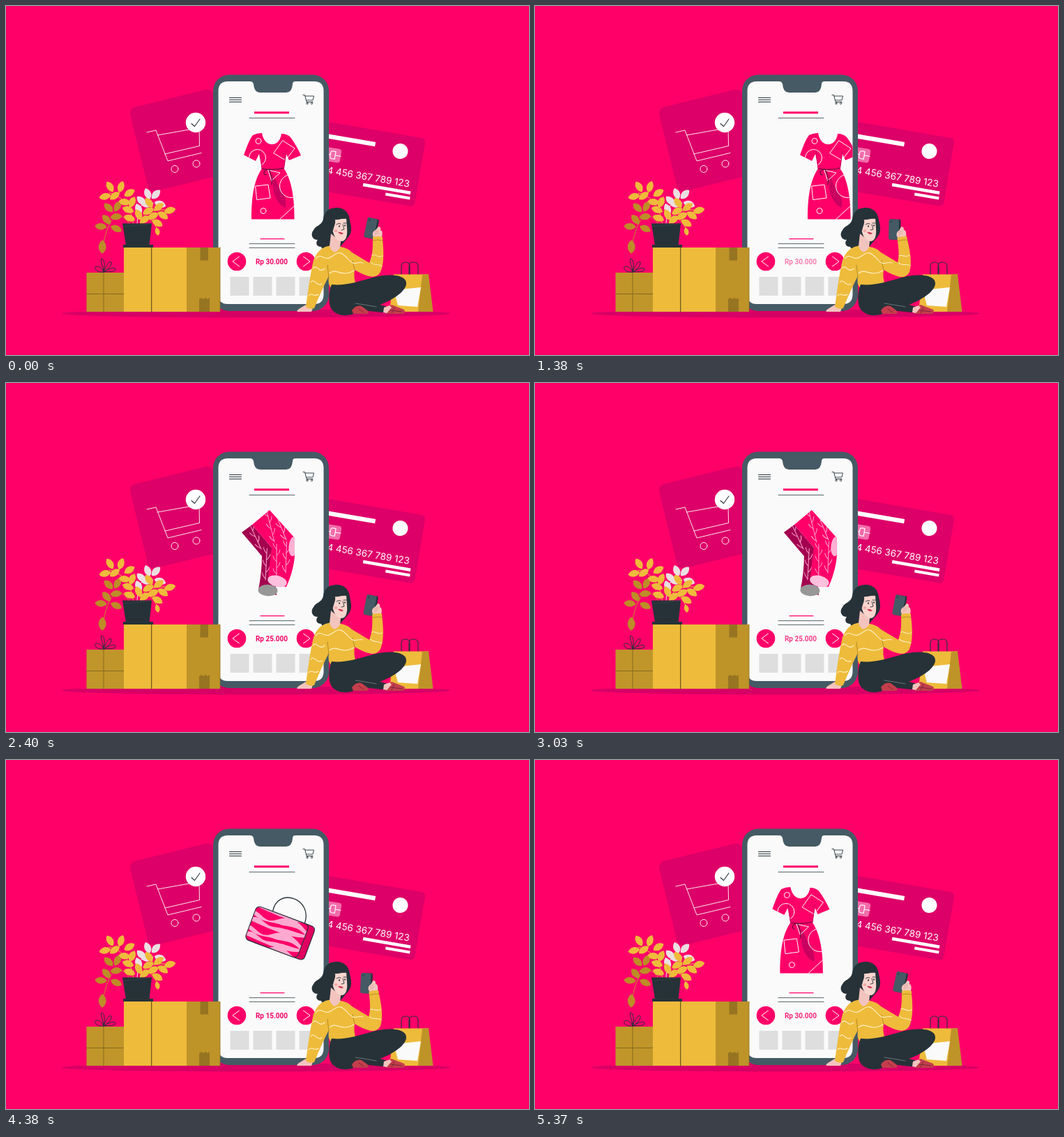
These frames come from a looping animation (750x500 px, 5400 ms). An HTML page with a canvas:

```html
<!DOCTYPE html>
<html lang="id">
<head>
<meta charset="utf-8">
<title>Belanja online</title>
<style>
html, body { margin: 0; width: 100%; height: 100%; overflow: hidden; background: #ff0069; }
canvas { display: block; width: 750px; height: 500px; }
</style>
</head>
<body>
<canvas id="stage" width="750" height="500"></canvas>
<script>
const ctx = document.getElementById('stage').getContext('2d');
const PINK = '#ff0069', DEEP = '#dd0068', DARK = '#263238', SLATE = '#455a64';
const WHITE = '#fff', PAPER = '#fafafa', GOLD = '#eebb3b', OCHRE = '#be9328', SKIN = '#f3c4be';
const LOOP = 5400, TURN = LOOP / 3;

// ---------- helpers ----------
const paths = {};
const path = d => paths[d] || (paths[d] = new Path2D(d));
const clamp = v => Math.max(0, Math.min(1, v));
const ramp = (t, a, b) => clamp((t - a) / (b - a));
const easeIn = u => u ** 1.65;

function fill(d, color) {
  ctx.fillStyle = color;
  ctx.fill(path(d));
}
function line(d, color, w = 1) {
  ctx.strokeStyle = color;
  ctx.lineWidth = w;
  ctx.stroke(path(d));
}
function oval(x, y, rx, ry, color, rot = 0) {
  ctx.beginPath();
  ctx.ellipse(x, y, rx, ry, rot, 0, Math.PI * 2);
  ctx.fillStyle = color;
  ctx.fill();
}
function ring(x, y, r, color, w = 1) {
  ctx.beginPath();
  ctx.arc(x, y, r, 0, Math.PI * 2);
  ctx.strokeStyle = color;
  ctx.lineWidth = w;
  ctx.stroke();
}
function box(x, y, w, h, color, r = 0) {
  ctx.beginPath();
  ctx.roundRect(x, y, w, h, r);
  ctx.fillStyle = color;
  ctx.fill();
}
function group(draw, { x = 0, y = 0, rot = 0, clip } = {}) {
  ctx.save();
  ctx.translate(x, y);
  ctx.rotate(rot * Math.PI / 180);
  if (clip) ctx.clip(path(clip));
  draw();
  ctx.restore();
}

// ---------- cards ----------
function cartCard() {
  group(() => box(0, 0, 123, 124, DEEP, 9), { x: 176, y: 147, rot: -13.8 });
  line('M202 181L215 178L232 222L280 210.5M217.5 185L277 174.5L277.5 200.5L228 212', WHITE, 0.9);
  ring(242, 233.5, 5, WHITE, 0.9);
  ring(273, 226, 5, WHITE, 0.9);
  oval(272, 167, 14.2, 14.2, WHITE);
  line('M266 168.5L270.5 172.5L278 162', DARK, 1.1);
}

function payCard() {
  group(() => {
    box(-170, 0, 170, 99, DEEP, 6);
    box(-143, 17, 73, 6.5, WHITE);
    box(-138, 35.5, 22, 20, '#f26cab', 4);
    line('M-138 45.5H-131M-124 45.5H-116M-131 43Q-131 40 -128 40H-124V51H-128Q-131 51 -131 48Z', WHITE, 1.1);
    oval(-33, 24, 11, 11, WHITE);
    box(-77.5, 78, 69, 4.6, WHITE);
    box(-43.5, 86, 35.5, 4.2, WHITE);
  }, { x: 602, y: 190, rot: 9.7 });
  group(() => {
    ctx.fillStyle = WHITE;
    ctx.font = '400 13.5px Inter, "Open Sans", sans-serif';
    ctx.textAlign = 'left';
    ctx.fillText('4 456 367 789 123', 0, 0);
  }, { x: 460, y: 239.5, rot: 9.7 });
}

// ---------- products ----------
const DRESS = 'M354 185Q360 182 367 182C370 203 392 204 395 183Q403 183 408 188C414 196 419 205 423 214L406 221L402 212L398.5 233C409 247 414 275 413.5 305.5H352C352 276 355 250 367 233L363 212L358 222L341 213.5C345 203 348 193 354 185Z';

function dress() {
  fill(DRESS, PINK);
  group(() => {
    fill('M382 240C388 250 390 259 395 264C400 271 402 281 401 289C390 285 383 270 383 258Z', '#c90060');
    ring(362, 193.5, 4, WHITE);
    ring(360.5, 217.5, 12, WHITE);
    ring(409, 258, 16.5, WHITE);
    ring(369, 293.5, 4, WHITE);
    line('M397 193L414 204L401 221L384 211Z', WHITE);
    line('M358 258L376 256L379 275L360 277.5Z', WHITE);
    line('M376 235L393 239L381 250Z', WHITE);
    line('M392 306L414 286', WHITE);
  }, { clip: DRESS });
  line('M367 233Q383 236 398.5 232M376 234C369 236 368 241 373 242M377 234Q383 246 381 256', '#5c1238', 1.2);
  line('M364 207L367 233M402 207L398.5 233', '#c90060');
}

const SOCK = 'M378 182L353 203L381 236L376 278Q388 292 402 292C409 277 414 258 414 245V222Z';
const BACK_SOCK = 'M338 214L353 203L381 236L386 282L388 304L362 296Q367 270 367 248Z';

function twig(x, y, rot, n) {
  group(() => {
    line(`M0 0V${-n * 9}`, '#ffa6cf', 1);
    for (let i = 0; i < n; i++) {
      const s = i % 2 ? 1 : -1;
      line(`M0 ${-i * 9 - 2}Q${s * 4} ${-i * 9 - 5} ${s * 5} ${-i * 9 - 10}`, '#ffa6cf', 1);
    }
  }, { x, y, rot });
}

function sock() {
  fill(BACK_SOCK, '#a3004f');
  group(() => {
    twig(372, 282, 3, 5);
    twig(366, 238, -25, 4);
  }, { clip: BACK_SOCK });
  oval(375.5, 297, 14, 8.3, '#979797', 0.05);
  fill(SOCK, PINK);
  group(() => {
    twig(388, 276, 0, 5);
    twig(385, 228, -14, 5);
    twig(401, 272, 2, 5);
    twig(402, 225, -22, 4);
    oval(412, 234, 6.5, 14, '#ffb0d4', 0.1);
  }, { clip: SOCK });
  oval(389, 284, 14, 8, '#ffc0dc', 0.25);
}

function handbag() {
  group(() => {
    line('M24 0C18 -36 72 -38 73 0', DARK, 1.3);
    box(8, 0, 82, 51, '#e0005f', 7);
    line('M15 0H83Q90 0 90 7V44Q90 51 83 51H15', DARK, 1.1);
    box(0, 0, 80, 51, PINK, 6);
    group(() => {
      for (let i = 0; i < 6; i++) {
        const y = -3 + i * 11, s = i % 2 ? 4 : -4;
        fill(`M-3 ${y}C12 ${y + s - 5} 18 ${y + 9 + s} 34 ${y + 1}S60 ${y - 6 - s} 83 ${y + s}L81 ${y + s + 4}C64 ${y + 2 - s} 52 ${y + 6} 39 ${y + 6}S15 ${y + 9 + s} -3 ${y + 4}Z`, '#ffa9d0');
      }
    }, { clip: 'M6 0H74Q80 0 80 6V45Q80 51 74 51H6Q0 51 0 45V6Q0 0 6 0Z' });
    ctx.beginPath();
    ctx.roundRect(0, 0, 80, 51, 6);
    ctx.strokeStyle = DARK;
    ctx.lineWidth = 1.1;
    ctx.stroke();
  }, { x: 360, y: 208.5, rot: 20.5 });
}

const ITEMS = [
  { draw: dress, price: 'Rp 30.000' },
  { draw: sock, price: 'Rp 25.000' },
  { draw: handbag, price: 'Rp 15.000' }
];

// every product takes the same turn: rest, slide out right, come in from the left
const phase = (t, i) => (t - i * TURN + LOOP) % LOOP;

function slide(p) {
  if (p < TURN) return 122 * easeIn(ramp(p, 960, TURN));
  return -220 * (1 - ramp(p, LOOP - 480, LOOP - 20)) ** 1.5;
}
function priceAlpha(p) {
  if (p < TURN) return 1 - easeIn(ramp(p, 960, 1600));
  return ramp(p, LOOP - 200, LOOP);
}

// ---------- phone ----------
const SCREEN = 'M318 108H350Q354 108 355 112Q356 124 364 124H402Q410 124 411 112Q411 108 415 108H442Q455.5 108 455.5 122V413Q455.5 427 442 427H318Q304.5 427 304.5 413V122Q304.5 108 318 108Z';

function phone(t) {
  box(297, 98.5, 166, 338.5, SLATE, 23);
  fill(SCREEN, PAPER);
  group(() => {
    ITEMS.forEach((item, i) => group(item.draw, { x: slide(phase(t, i)) }));
  }, { clip: SCREEN });

  line('M320.5 131.5H337.5M320.5 134.5H337.5M320.5 137.5H337.5', DARK, 1);
  line('M426 127.5H428.5L431 137.5H440M429 129H441.5L440 135H430.5', DARK, 0.9);
  ring(432, 139.5, 1.2, DARK, 0.9);
  ring(438.5, 139.5, 1.2, DARK, 0.9);
  box(356, 151.3, 50, 2.9, PINK);
  line('M349 160.5H414', '#59656a', 1);
  line('M365 333.7H399', PINK, 1.2);
  line('M349 340.6H414M349 346.4H414', '#59656a', 1);
  oval(331, 366, 13.3, 13.3, PINK);
  oval(430, 366, 13.3, 13.3, PINK);
  line('M334.5 359L325 366L334.5 373M426.5 359L436 366L426.5 373', WHITE, 1);
  for (let i = 0; i < 4; i++) box(321.5 + i * 33, 388, 27, 27, '#dedede');

  ctx.font = '700 10px Roboto, sans-serif';
  ctx.textAlign = 'center';
  ctx.fillStyle = '#f20064';
  ITEMS.forEach((item, i) => {
    ctx.globalAlpha = priceAlpha(phase(t, i));
    ctx.fillText(item.price, 381, 370);
  });
  ctx.globalAlpha = 1;
}

// ---------- boxes and plant ----------
function leaf(x, y, rot, color, k = 1.15) {
  group(() => {
    ctx.scale(k, k);
    fill('M-7.5 0C-3 -6 4 -5.5 7.5 0C3 5.5 -4 5 -7.5 0Z', color);
  }, { x, y, rot });
}
function leaves(list, color) {
  for (const [x, y, rot, k] of list) leaf(x, y, rot, color, k);
}

function plant() {
  const brown = '#bd8d27', pale = '#eadfe1';
  line('M183 315C180 289 168 272 148 268', GOLD, 1);
  line('M178 314C166 295 150 289 139 343', brown, 1);
  line('M188 315C188 292 196 278 208 271', pale, 1);
  line('M192 314C195 293 216 290 236 293M193 312C200 299 213 304 217 323', GOLD, 1);
  leaves([[147, 289, 45], [160, 287, -60], [158, 302, -5], [136, 316, 5], [144, 306, 50], [158, 319, 25], [138, 345, 92, 1.3]], brown);
  leaves([[203, 269, 70], [215, 270, -45], [194, 279, 45], [221, 284, 20], [203, 284, -10], [190, 291, 70]], pale);
  leaves([[149, 259, 60], [165, 259, -70], [177, 268, -30], [142, 273, -12], [156, 272, -35], [170, 281, 10],
    [181, 281, -65], [175, 292, 20], [205, 282, 55], [204, 294, -25], [219, 288, -35], [235, 293, -15],
    [225, 300, 35], [190, 299, 65], [177, 304, 20], [199, 306, -35], [211, 301, -25], [217, 311, 30], [217, 323, 78, 0.8]], GOLD);
  fill('M167 311.5H209L205.5 343H172Z', DARK);
  fill('M168 342H211V346H168Z', DARK);
  line('M169 316L208 312', '#36454c', 0.8);
}

function boxes() {
  box(115.5, 382, 54, 56, '#c0962a');
  line('M115.5 412.5H169M140 382V438', '#86691e', 1);
  line('M140 381C130 383 124 374 130 373C136 373 139 379 140 381C139 373 135 364 137 362C143 363 141 376 140 381C143 373 148 364 151 367C152 372 145 379 140 381C147 376 158 373 157 378C154 382 145 380 140 381', DARK, 1);
  box(169, 346, 90.5, 92, GOLD);
  box(259, 346, 48, 92, OCHRE);
  line('M208.7 346V438', '#5c4b1c', 1.1);
  box(278.5, 346, 11.5, 18.5, '#967421');
  fill('M277 420L280 418L283 420L286 418L289 420L292 418V438H277Z', '#967421');
  line('M307 346V438', '#8d701f', 0.8);
}

// ---------- woman and shopping bag ----------
function shoppingBag() {
  line('M567 386V373Q567 367 573 367Q579 367 579 373V386M578 386V373Q578 367 584 367Q591 367 591 373V386', DARK, 1.1);
  fill('M556 384.5H606L596 438H550Z', GOLD);
  fill('M597 384.5H606L612.5 438H591Z', OCHRE);
  fill('M556 407L595 403L590 431L562 429Z', PAPER);
}

// 1 = leaned back, 0 = closest to the face; two sways per loop
const armPose = t => (1 + Math.cos(t / LOOP * 4 * Math.PI)) / 2;

function forearm(pose) {
  group(() => {
    group(() => {
      box(-7.5, -14.5, 16, 29, DARK, 2);
      box(-8.3, -14.5, 14.5, 29, SLATE, 2);
      oval(-5, -11, 1, 1, DARK);
    }, { x: -7, y: -60.5, rot: 12 - 3 * (1 - pose) });
    fill('M-4 -48C-7 -53 -4 -57 -1 -58L3 -63Q7 -63 6 -58Q10 -57 8 -48L7 -43H-4Z', SKIN);
    line('M-2 -55L3 -57M-2 -52L3 -54', '#d58f8d', 0.7);
    fill('M-5 -48Q2 -50 9 -48L9 -44C11 -26 11 -9 6 2C1 11 -10 10 -15 4L-9 -14C-5 -23 -5 -34 -5 -48Z', GOLD);
    line('M-5 -43Q2 -45 9 -43', '#ad851f', 0.8);
    line('M-6 -22C-2 -25 2 -17 9 -21M-8 -12C-3 -6 2 -11 8 -6', '#fff0c5', 1);
  }, { x: 531, y: 379, rot: -8 * (1 - pose) });
}

function woman(t) {
  // hair behind the neck
  fill('M470 289.5C482 287 492 294 493 307C495 315 497 324 491 331L480 344C475 350 469 356 462 353C457 351 453 348 452 345C446 345 443 340 447 335C439 335 436 327 441 321C444 314 453 315 455 305C456 296 462 290 470 289.5Z', DARK);
  // supporting hand and sleeve
  fill('M430 428L420 434Q415 438 419 438H438L441 430Z', SKIN);
  fill('M458 345L470 342L480 345Q491 347 496 353L521 368L528 387Q520 390 500 378Q498 388 502 400L466 404Q461 398 463 387Q453 406 442 433Q435 435 430 431C433 410 436 385 441 364Q447 349 458 345Z', GOLD);
  line('M461 371Q462 381 463 388M497 365L500 378', '#a78020', 0.8);
  line('M444 362C452 352 456 367 467 359S481 352 491 363S503 365 512 368', '#fff0c5', 1.1);
  line('M440 376C446 369 449 384 457 376M464 383C474 374 480 390 499 379M437 396C442 389 446 403 453 398M434 415C438 409 442 418 448 413', '#fff0c5', 1.1);
  // neck and face
  fill('M466 326L474 333L480 337L479 346Q470 360 464 344Z', SKIN);
  fill('M470 306C476 307 483 304 488 304L489 319C490 330 487 337 481 337C474 337 469 329 468 318Z', '#f9d5ce');
  fill('M468 305C475 307 486 303 491 306C490 297 480 294 471 297Z', DARK);
  fill('M470 303C475 309 470 315 469 322C465 320 464 312 465 304Z', DARK);
  line('M474 313Q477 310.5 480 312M484 311L488 311M483 313L485 320L481 321', DARK, 0.9);
  oval(478, 315.5, 1, 1.2, DARK);
  oval(486, 314.5, 0.9, 1.2, DARK);
  fill('M476 324Q480 323 484 326Q480 329 476 324Z', '#cf3b54');
  oval(473, 322, 2.5, 2, '#f0aaa8');
  // legs
  fill('M467 399C486 401 505 395 526 389C547 383 575 384 574 398C573 411 548 424 536 428L552 432L548 439C526 439 514 434 504 438C491 447 470 444 465 431C462 420 463 408 467 399Z', DARK);
  line('M501 426Q515 428 531 431', '#77848a', 0.8);
  // shoes
  const shoe = '#c43e4b';
  fill('M496 436Q502 428 510 430L518 436Q523 441 515 441H498Z', shoe);
  fill('M545 432L553 428L571 435Q574 440 569 441H546Q541 439 545 432Z', shoe);
  fill('M542 432L550 429L553 432L546 440L541 439Z', SKIN);
  line('M551 436L568 438M506 434L513 439M557 432L553 440', '#72253a', 0.9);
  forearm(armPose(t));
}

// ---------- loop ----------
function draw(t) {
  ctx.fillStyle = PINK;
  ctx.fillRect(0, 0, 750, 500);
  oval(359, 440.5, 279, 6, '#d70065');
  cartCard();
  payCard();
  phone(t);
  boxes();
  plant();
  shoppingBag();
  woman(t);
}

ctx.lineJoin = 'round';
ctx.lineCap = 'round';
const start = performance.now();
function tick() {
  draw((performance.now() - start) % LOOP);
  requestAnimationFrame(tick);
}
tick();
</script>
</body>
</html>
```
